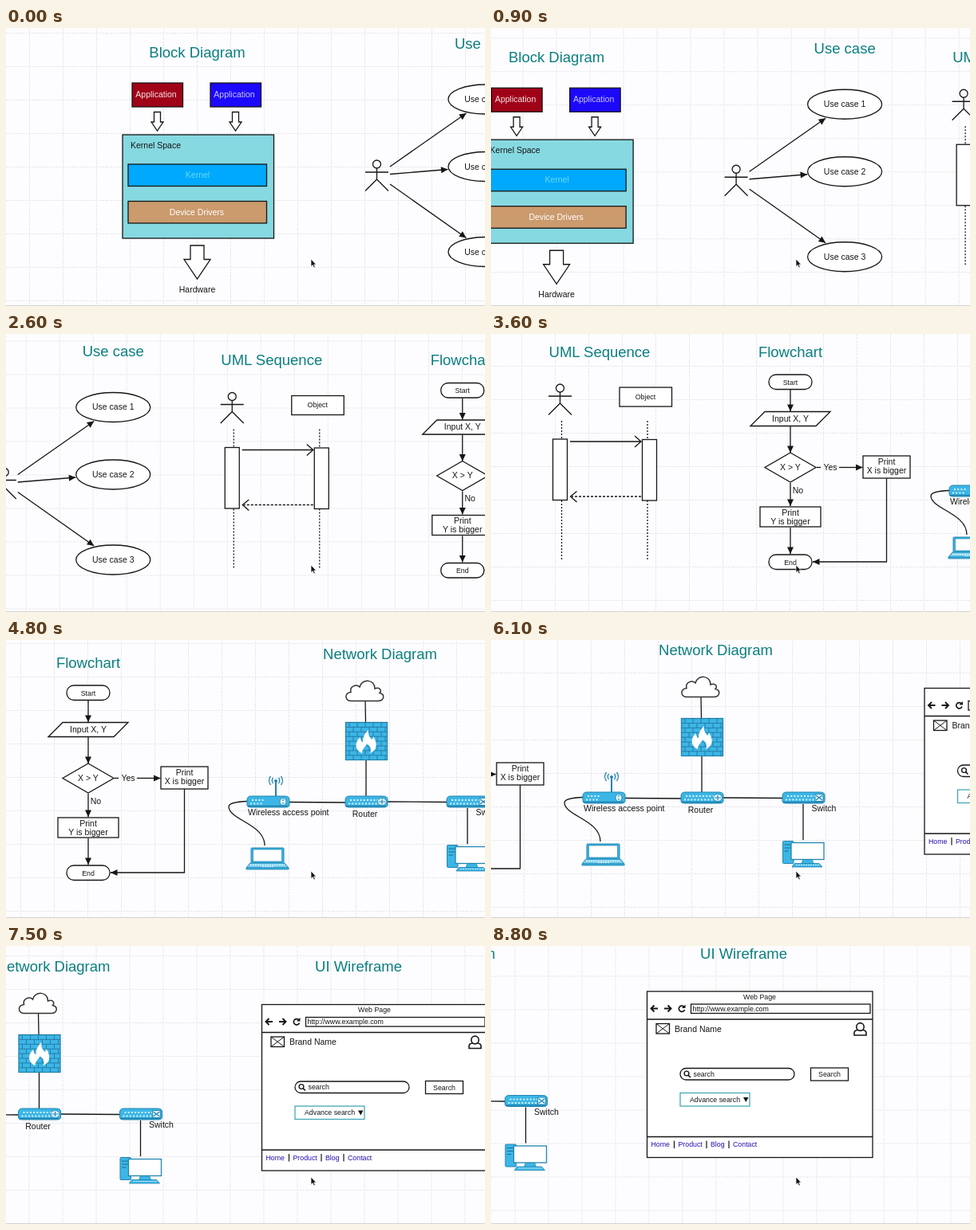
Animation of 600 by 349 pixels, one loop 8.9 s. Source, as an HTML page:

```html
<!DOCTYPE html>
<html lang="en">
<head>
<meta charset="utf-8">
<title>Diagram canvas</title>
<style>
html, body { margin: 0; width: 100%; height: 100%; overflow: hidden; background: #fdfcfe; }
svg { display: block; width: 100vw; height: 100vh; }
text { font-family: "Liberation Sans", Arial, sans-serif; }
</style>
</head>
<body>
<svg id="stage" viewBox="0 0 600 349"></svg>
<script>
const INK = '#161616', SKY = '#3cb6e6', DEEP = '#2385b0', TEAL = '#0a7f80';
const LOOP = 8900, STEP = 100;

// Shape helpers, all return SVG markup
const path = (d, fill = 'none', stroke = INK, w = 1.3, more = '') =>
  `<path d="${d}" fill="${fill}" stroke="${stroke}" stroke-width="${w}" ${more}/>`;
const rect = (x, y, x2, y2, fill = 'none', r = 0, stroke = INK, w = 1.3) =>
  `<rect x="${x}" y="${y}" width="${x2 - x}" height="${y2 - y}" rx="${r}" fill="${fill}" stroke="${stroke}" stroke-width="${w}"/>`;
const oval = (x, y, rx, ry = rx, fill = 'none', stroke = INK, w = 1.3) =>
  `<ellipse cx="${x}" cy="${y}" rx="${rx}" ry="${ry}" fill="${fill}" stroke="${stroke}" stroke-width="${w}"/>`;
const text = (s, x, y, size = 10.5, fill = INK, anchor = 'middle') =>
  `<text x="${x}" y="${y}" font-size="${size}" fill="${fill}" text-anchor="${anchor}">${s}</text>`;
const title = (s, x, y) => text(s, x, y, 18.5, TEAL);
const group = (x, y, ...parts) => `<g transform="translate(${x} ${y})">${parts.join('')}</g>`;

function arrow(x1, y1, x2, y2) {
  const a = Math.atan2(y2 - y1, x2 - x1) * 180 / Math.PI;
  return path(`M${x1} ${y1}L${x2} ${y2}`) +
    `<path d="M0 0L-8.5 -4V4Z" fill="${INK}" transform="translate(${x2} ${y2}) rotate(${a})"/>`;
}

const actor = (x, y) => oval(x, y, 5) +
  path(`M${x} ${y + 5}V${y + 19}M${x - 14.5} ${y + 10}H${x + 14.5}M${x - 14.5} ${y + 33.5}L${x} ${y + 19}L${x + 14.5} ${y + 33.5}`);

// Block arrow pointing down: half shaft, half head, top, neck, tip
const fatArrow = (x, s, h, top, neck, tip) =>
  path(`M${x - s} ${top}H${x + s}V${neck}H${x + h}L${x} ${tip}L${x - h} ${neck}H${x - s}Z`, '#fff');

function blocks() {
  const app = (x, fill, color) => rect(x, 69, x + 63.5, 99, fill) + text('Application', x + 30, 86.5, 10.5, color);
  return group(0, 0,
    title('Block Diagram', 239.5, 37),
    app(158, '#a00318', '#f4e4e6'), app(256, '#1c08fb', '#c9c6ff'),
    fatArrow(189.5, 4, 7.5, 105.5, 118, 129), fatArrow(287.5, 4, 7.5, 105.5, 118, 129),
    rect(146, 134, 335.5, 264, '#86d9e1'),
    text('Kernel Space', 156, 150.5, 10.5, INK, 'start'),
    rect(153, 171, 326.5, 198.5, '#00a9fd'), text('Kernel', 240, 188, 10.5, '#62dcf2'),
    rect(153, 217.5, 326.5, 245, '#cb9a6d'), text('Device Drivers', 239, 234.5, 10.5, '#fff'),
    fatArrow(239.5, 8.5, 16.5, 273, 290.5, 315),
    text('Hardware', 239.5, 332));
}

function useCases() {
  const cases = [99.5, 184, 291].map((y, i) =>
    oval(282.5, y, 46.5, 18.5, '#fff') + text('Use case ' + (i + 1), 282.5, y + 3.5));
  return group(318, -10,
    title('Use case', 282.5, 36), actor(146.5, 181), ...cases,
    arrow(163, 184, 258.5, 117), arrow(163, 193.5, 235.5, 187.5), arrow(163, 206, 258.5, 273.5));
}

function sequence() {
  const life = x => path(`M${x} 109V132M${x} 209V284`, 'none', INK, 1.3, 'stroke-dasharray="2 2"');
  return group(663, 8,
    title('UML Sequence', 136, 29), actor(86.5, 68),
    rect(161, 67, 226.5, 91, '#fff'), text('Object', 193.5, 81.5, 8.8),
    life(88.5), life(196),
    rect(77.5, 132, 95.5, 208.5, '#fff'), rect(189.5, 132.5, 207.5, 209, '#fff'),
    path('M99 135H188M180 128L188 135L180 142M107.5 197.5L99.5 204L107.5 211'),
    path('M188 204H101', 'none', INK, 1.3, 'stroke-dasharray="3 2"'));
}

function flowchart() {
  const pill = (s, y) => rect(348, y, 402, y + 18.5, '#fff', 9) + text(s, 375, y + 12.5, 8.8);
  const print = (s, x, x2, y, y2) => rect(x, y, x2, y2, '#fff') +
    text('Print', (x + x2) / 2, y + 11) + text(s, (x + x2) / 2, y + 22);
  return group(663, 8,
    title('Flowchart', 375, 29), pill('Start', 51), arrow(375, 70, 375, 97),
    path('M343 97.5H425L407 115.5H325Z', '#fff'), text('Input X, Y', 375, 110),
    arrow(375, 116, 375, 149),
    path('M375 149L407 167.5L375 186L343 167.5Z', '#fff'), text('X &gt; Y', 375, 171),
    path('M408 167.5H413'), text('Yes', 425, 171), arrow(436, 167.5, 465.5, 167.5),
    print('X is bigger', 466, 525, 153, 181),
    arrow(375, 187, 375, 216), text('No', 384.5, 200),
    print('Y is bigger', 337, 413, 217, 242),
    arrow(375, 243, 375, 276), pill('End', 277),
    path('M495.5 181V286'), arrow(496, 286, 403, 286));
}

function device(x, dots, mark) {
  const lights = path(`M${x + 6} 196H${x + 6 + dots}M${x + 4} 200.5H${x + 4 + dots}`, 'none', '#d8f2fc', 1.8, 'stroke-dasharray="2 2.2"');
  return path(`M${x + 5} 191H${x + 47}Q${x + 53} 191 ${x + 53} 195V202Q${x + 53} 205 ${x + 48} 205H${x + 4}Q${x} 205 ${x} 202V196Q${x} 191 ${x + 5} 191Z`, SKY, DEEP, 1) +
    path(`M${x + 1} 203.5H${x + 51}`, 'none', '#1e7fae', 1.4) + lights + mark;
}

function network() {
  let bricks = '';
  for (let r = 0; r < 8; r++) {
    const y = 98.5 + r * 5.9;
    bricks += `M238.5 ${y}H290.5`;
    for (let x = 243 + (r % 2) * 5; x < 290; x += 10) bricks += `M${x} ${y}v5.9`;
  }
  const cross = (x, d) => path(d, 'none', DEEP, 1.2, `transform="translate(${x} 198)"`);
  const knob = (x, rx, ry) => oval(x, 198, rx, ry, '#e2f5fc', DEEP, .9);
  return group(1122, 7,
    title('Network Diagram', 281.5, 19),
    path('M263 71L263.5 98M264 146V191M168 198.5L238 199M291 198L365 198.5M391 206V251'),
    path('M115 197.5C100 198 92 200 92 204.5C93 221 137 226 137 253'),
    path('M246 71.5C237 72 236.500 61 245 60.500C243 53 252 50 256 54C259 43 275 44 275 56C281 53.500 284 58 281 61.500C288 63 287 71.500 279 71.500Z', '#fff', '#333', 1.5),
    rect(238.5, 98.5, 290.5, 145.5, SKY, 0, DEEP), path(bricks, 'none', '#2278a2', .9),
    path('M259 137C249 133 250 122 257 117C257 121 259 123 260 123C260 116 263 111 267 108C266 115 269 117 271 120C272 119 273 118 273 116C278 124 279 133 269 137C272 131 268 128 265 125C264 129 259 131 259 137Z', '#fff', 'none', 0),
    path('M151 192V174', 'none', DEEP, 2), oval(151, 172, 1.5, 1.5, DEEP, DEEP, 1),
    path('M147.500 168Q145 171.500 147.500 175M144.500 166Q140.500 171.500 144.500 177M154.500 168Q157 171.500 154.500 175M157.500 166Q161.500 171.500 157.500 177', 'none', DEEP, 1.3),
    device(115, 15, knob(160, 4, 4.500) + cross(160, 'M0 -3V-1M0 1V3')),
    device(238, 36, knob(284, 5.500, 4.500) + cross(284, 'M-4 0H4M0 -3V3')),
    device(365, 36, rect(406, 193.500, 416, 202.500, '#e2f5fc', 0, DEEP, .9) + cross(411, 'M-4 -3L4 3M-4 3L4 -3')),
    text('Wireless access point', 116, 215, 10.5, INK, 'start'),
    text('Router', 262.500, 217), text('Switch', 401.500, 215, 10.5, INK, 'start'),
    // laptop
    rect(120, 256, 161, 275, SKY, 1, DEEP, 1), rect(122.500, 258, 158.500, 273, '#fff', 0, DEEP, .7),
    path('M119 275H162L167 281H114Z', '#79d0f1', DEEP, 1),
    path('M119 277.500H162M134 279.500H148', 'none', '#fff', 1, 'stroke-dasharray="2 1"'),
    path('M114 281H167V283H114Z', SKY, DEEP, .8),
    // desktop
    rect(365.500, 252.500, 379, 280.500, SKY, 1, DEEP, 1),
    path('M367.500 257H376M367.500 261H376M367.500 265H373', 'none', '#1b6c95', 1),
    path('M391 275H402L404 281H389Z', SKY, DEEP, .8),
    rect(376, 254.500, 417, 275.500, '#fff', 0, DEEP, 1.3),
    path('M380 280.500H411L415 285H377Z', SKY, DEEP, .8),
    path('M382 282.500H411', 'none', '#d8f2fc', 1, 'stroke-dasharray="2 1"'));
}

function wireframe() {
  const small = (s, x, y, fill = INK) => text(s, x, y, 8.8, fill, 'start');
  const links = [['Home', 200.5], ['Product', 234.5], ['Blog', 275], ['Contact', 303]];
  return group(1469.5, 10.5,
    title('UI Wireframe', 316.5, 15.500),
    rect(195.500, 57, 478, 265.500, '#fff'),
    path('M195.500 92H478M195.500 239.500H478'),
    text('Web Page', 336.500, 66.500, 8.8),
    path('M209 78.500H201M204.500 74.500L200.500 78.500L204.500 82.500M217 78.500H225M221.500 74.500L225.500 78.500L221.500 82.500', 'none', INK, 1.9),
    path('M241.500 76A3.700 3.700 0 1 0 242.500 80', 'none', INK, 1.7), path('M243.500 73.500V78H239Z', INK, 'none', 0),
    rect(250.500, 73, 475, 84.500, '#fff'), small('http://www.example.com', 252.500, 81.500),
    rect(207, 97.500, 223.500, 110, '#fff'), path('M207 97.500L223.500 110M207 110L223.500 97.500', 'none', INK, 1),
    text('Brand Name', 230, 107.500, 10.5, INK, 'start'),
    path('M455 112V109Q455 106 459.500 105.500H465.500Q470 106 470 109V112Z', '#fff', INK, 1.6), oval(462.500, 101.500, 4.700, 4.900, '#fff', INK, 1.6),
    rect(237, 153.500, 380, 168, '#fff', 7.200),
    oval(245, 160, 2.900, 2.900, 'none', INK, 1.4), path('M247 162.200L250 165', 'none', INK, 1.700),
    small('search', 253.500, 163.500),
    rect(400.500, 153, 447.500, 169, '#fff'), text('Search', 424, 164, 8.8),
    rect(237, 184.500, 324, 201, '#fff', 0, '#45a9b5'), small('Advance search', 249, 195.500),
    path('M316 190H322.500L319.250 196Z', INK, 'none', 0),
    ...links.map(([s, x]) => small(s, x, 252, '#2411ad')),
    path('M229.500 244.500V254M270 244.500V254M298 244.500V254', 'none', INK, 1.2));
}

const stage = document.getElementById('stage');
stage.innerHTML = `
  <defs><pattern id="grid" width="42" height="42" patternUnits="userSpaceOnUse">
    ${path('M29.500 0V42M0 6.500H42', 'none', '#e9e8ed', 1, 'stroke-dasharray="3 1"')}
  </pattern></defs>
  <rect width="600" height="349" fill="#fdfcfe"/>
  <g id="world"><rect x="-60" y="-60" width="2300" height="500" fill="url(#grid)"/>
    ${blocks()}${useCases()}${sequence()}${flowchart()}${network()}${wireframe()}</g>
  ${path('M0 348.500H600', 'none', '#d2d1d4', 1)}
  ${path('M382 290V299.500L384.200 297.600L385.700 301L387.300 300.300L385.800 297H388.500Z', '#111', '#fff', .7)}`;
const world = document.getElementById('world');

// Scroll path: time, x, y
const KEYS = [[0, 0, 0], [1800, -318, 10], [3600, -663, -8], [4800, -935, -2],
  [6100, -1122, -7], [7500, -1344.5, 6], [8800, -1469.5, -10.5]];
const slope = (i, k) => (KEYS[i + 1][k] - KEYS[i][k]) / (KEYS[i + 1][0] - KEYS[i][0]);

function tangent(i, k) {
  if (i === 0) return slope(0, k);
  if (i === KEYS.length - 1) return slope(i - 1, k);
  const a = slope(i - 1, k), b = slope(i, k);
  return a * b <= 0 ? 0 : 2 * a * b / (a + b);
}

function scroll(t, k) {
  let i = 0;
  while (i < KEYS.length - 2 && t > KEYS[i + 1][0]) i++;
  const [p, q] = [KEYS[i], KEYS[i + 1]], d = q[0] - p[0], u = (t - p[0]) / d, v = 1 - u;
  return v * v * (1 + 2 * u) * p[k] + u * u * (1 + 2 * v) * q[k] +
    d * u * v * (v * tangent(i, k) - u * tangent(i + 1, k));
}

function draw(now) {
  const t = Math.floor((now % LOOP) / STEP) * STEP;
  world.setAttribute('transform', `translate(${scroll(t, 1).toFixed(2)} ${scroll(t, 2).toFixed(2)})`);
}

function loop() {
  draw(performance.now());
  requestAnimationFrame(loop);
}
loop();
</script>
</body>
</html>
```
